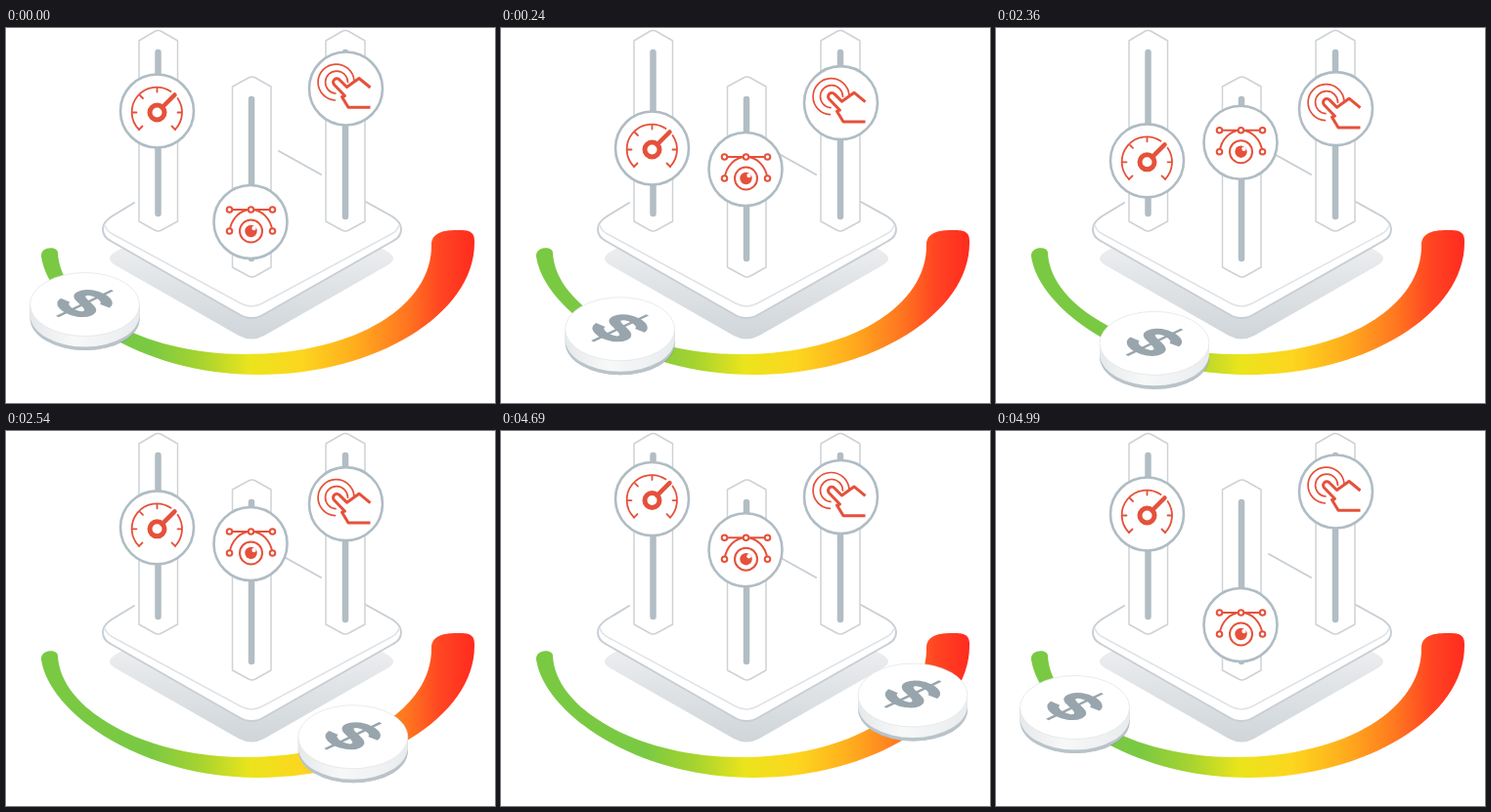
Write an HTML page that moves like this. It is 500 px wide and 384 px high and loops after 6990 ms.

```html
<!DOCTYPE html>
<html lang="en">
<head>
<meta charset="utf-8">
<title>Cost sliders</title>
<style>
  html, body { margin: 0; width: 100%; height: 100%; overflow: hidden; background: #fff; }
  svg { display: block; width: 100%; height: 100%; }
  .edge { fill: none; stroke: #c8ced4; stroke-width: 2; stroke-linecap: round; stroke-linejoin: round; }
  .rail { fill: #fff; stroke: #cdd2d6; stroke-width: 1.5; stroke-linejoin: round; }
  .track { stroke: #b2bdc4; stroke-width: 6.5; stroke-linecap: round; }
  .knob { fill: #fff; stroke: #b0bcc4; stroke-width: 2.6; }
  .icon { fill: none; stroke: #e5513a; stroke-width: 2; stroke-linecap: round; stroke-linejoin: round; }
  .icon .node { fill: #fff; }
  .icon .solid { fill: #e5513a; stroke: none; }
</style>
</head>
<body>
<svg viewBox="0 0 500 384">
  <defs>
    <linearGradient id="scale" gradientUnits="userSpaceOnUse" x1="36" y1="0" x2="480" y2="0">
      <stop offset=".25" stop-color="#7ac943"/>
      <stop offset=".37" stop-color="#a8d42f"/>
      <stop offset=".48" stop-color="#ebe41c"/>
      <stop offset=".6" stop-color="#fcd61f"/>
      <stop offset=".72" stop-color="#ffae1d"/>
      <stop offset=".84" stop-color="#ff7720"/>
      <stop offset=".92" stop-color="#ff4522"/>
      <stop offset="1" stop-color="#ff2a1f"/>
    </linearGradient>
    <linearGradient id="shade" x1="0" y1="0" x2="0" y2="1">
      <stop offset="0" stop-color="#f3f4f5"/>
      <stop offset=".4" stop-color="#eeeff1"/>
      <stop offset="1" stop-color="#cfd5d9"/>
    </linearGradient>
    <linearGradient id="rim">
      <stop offset="0" stop-color="#e6e9eb"/>
      <stop offset=".4" stop-color="#f7f8f8"/>
      <stop offset="1" stop-color="#e9ecee"/>
    </linearGradient>
  </defs>

  <!-- platform -->
  <path fill="url(#shade)" d="M112 229L251 150 390 229Q402 236 390 243L264 315Q251 322 238 315L112 243Q100 236 112 229Z"/>
  <path fill="#fff" d="M108 193L251 111 395 193Q404 199 404 206 404 214 396 218L264 293Q251 301 238 293L107 218Q99 214 99 206 99 199 108 193Z"/>
  <path class="edge" d="M131 179L108 193Q99 199 99 206 99 214 107 218L238 293Q251 301 264 293L396 218Q404 214 404 206 404 199 395 193L368 178M279 126L322 150"/>
  <path class="edge" style="stroke:#dfe3e6;stroke-width:1.5" d="M101 202Q103 208 109 211L240 282Q251 288 262 282L394 211Q400 208 402 202"/>

  <!-- rails -->
  <path class="rail" d="M136 13L152 3.500Q155.500 1.500 159 3.500L175.500 13V198L159 207Q155.500 209 152 207L136 198Z"/>
  <path class="rail" d="M327 13L343.500 3.500Q347 1.500 350.500 3.500L367 13V198L350.500 207Q347 209 343.500 207L327 198Z"/>
  <path class="rail" d="M231.500 60L248 51Q251.500 49 255 51L271 60V245L255 254Q251.500 256 248 254L231.500 245Z"/>
  <path class="track" d="M155.500 25V190M347 25V193M251 73V236"/>

  <path fill="url(#scale)" d="M36 234C44 288 136 355 258 355C380 355 479 292 479 220C480 206 470 207 460 207C447 207 435 210 435 222C436 283 360 334 244 334C139 334 55 284 53 230C53 223 35 223 36 234Z"/>

  <g id="gauge">
    <circle class="knob" r="37.500"/>
    <g class="icon" transform="translate(0 1.500)">
      <path d="M-18.500 17.500A25.500 25.500 0 0 1 14 -21.500M21 -14.500A25.500 25.500 0 0 1 18.500 17.500" stroke-width="1.800"/>
      <path d="M0 -25V-21M-17.500 -17.500L-14.500 -14.500M-25 0H-21M25 0H21M-18.500 17.500L-15 14M18.500 17.500L15 14" stroke-width="1.800"/>
      <circle r="7.500" stroke-width="5"/>
      <path d="M5 -5L18 -18" stroke-width="4.500"/>
    </g>
  </g>

  <g id="curve">
    <circle class="knob" r="37.500"/>
    <g class="icon" transform="translate(.5 .500)">
      <path d="M-22 -13H22M-22 9C-20 -4 -11 -13 0 -13S20 -4 22 9"/>
      <g class="node">
        <circle cx="-22" cy="-13" r="2.800"/><circle cy="-13" r="2.800"/><circle cx="22" cy="-13" r="2.800"/>
        <circle cx="-22" cy="9" r="2.800"/><circle cx="22" cy="9" r="2.800"/>
        <circle cy="9" r="11.500"/>
      </g>
      <circle class="solid" cy="9" r="6.200"/>
      <circle cx="3" cy="6" r="2.200" fill="#fff" stroke="none"/>
    </g>
  </g>

  <g id="touch">
    <circle class="knob" r="37.500"/>
    <g class="icon">
      <path d="M8.500 -8A18.500 18.500 0 1 0 -11 12M2 -6.500A11.500 11.500 0 1 0 -10.500 5" stroke-width="1.700"/>
      <path d="M25 -1L13.500 -10.500 1 -1.500 -6.500 -9A3.700 3.700 0 0 0 -12 -4L-1 7.500 -4 8.500 2.500 19.300H25" stroke-linecap="butt" stroke-width="3"/>
    </g>
  </g>

  <g id="coin">
    <ellipse cx="1" cy="15" rx="55" ry="32" fill="#4c5963" opacity=".4"/>
    <path fill="#b9c3ca" d="M-56 0V14A56 33 0 0 0 56 14V0Z"/>
    <path fill="url(#rim)" d="M-56 0V10.500A56 33 0 0 0 56 10.500V0Z"/>
    <ellipse rx="56" ry="32.500" fill="#fff" stroke="#e3e6e8" stroke-width=".8"/>
    <g transform="translate(0 -1) matrix(.88 .46 -.88 .42 0 0)" fill="none" stroke="#98a5ad">
      <path stroke-width="9.500" d="M14 -9C12 -21 -13 -21 -13 -9.500C-13 2 13 -3 13 9.500C13 21 -13 21 -14.500 8"/>
      <path stroke-width="3" d="M0 -32V32"/>
    </g>
  </g>
</svg>
<script>
const LOOP = 6990, STEP = 30;

// coin is the angle on its ellipse, in degrees from the lowest point
const low  = { gauge: 85,  curve: 198.5, touch: 62, coin: -52.5 };
const mid  = { gauge: 142, curve: 117.5, touch: 84, coin: -28.4 };
const high = { gauge: 68,  curve: 114,   touch: 68, coin: 70.4 };

const moves = [
  { start: 30,   steps: 12, from: low,  to: mid,  ease: 0 },
  { start: 2360, steps: 12, from: mid,  to: high, ease: .42 },
  { start: 4690, steps: 11, from: high, to: low,  ease: 0 }
];
const knobX = { gauge: 154.5, curve: 250, touch: 347.5 };

const place = (id, x, y) =>
  document.getElementById(id).setAttribute('transform', `translate(${x} ${y})`);
const mix = (a, b, p) => a + (b - a) * p;

function draw(t) {
  const move = moves.filter(m => t >= m.start).pop();
  const { start, steps, from, to, ease } = move || moves[0];
  const p = move ? Math.min(1, (Math.floor((t - start) / STEP) + 1) / steps) : 0;

  for (const id in knobX) place(id, knobX[id], mix(from[id], to[id], p));

  const q = p - ease * Math.sin(2 * Math.PI * p) / (2 * Math.PI);
  const angle = mix(from.coin, to.coin, q) * Math.PI / 180;
  place('coin', 244 + 206 * Math.sin(angle), 204.5 + 129 * Math.cos(angle));
}

function tick() {
  draw(performance.now() % LOOP);
  requestAnimationFrame(tick);
}
tick();
</script>
</body>
</html>
```
